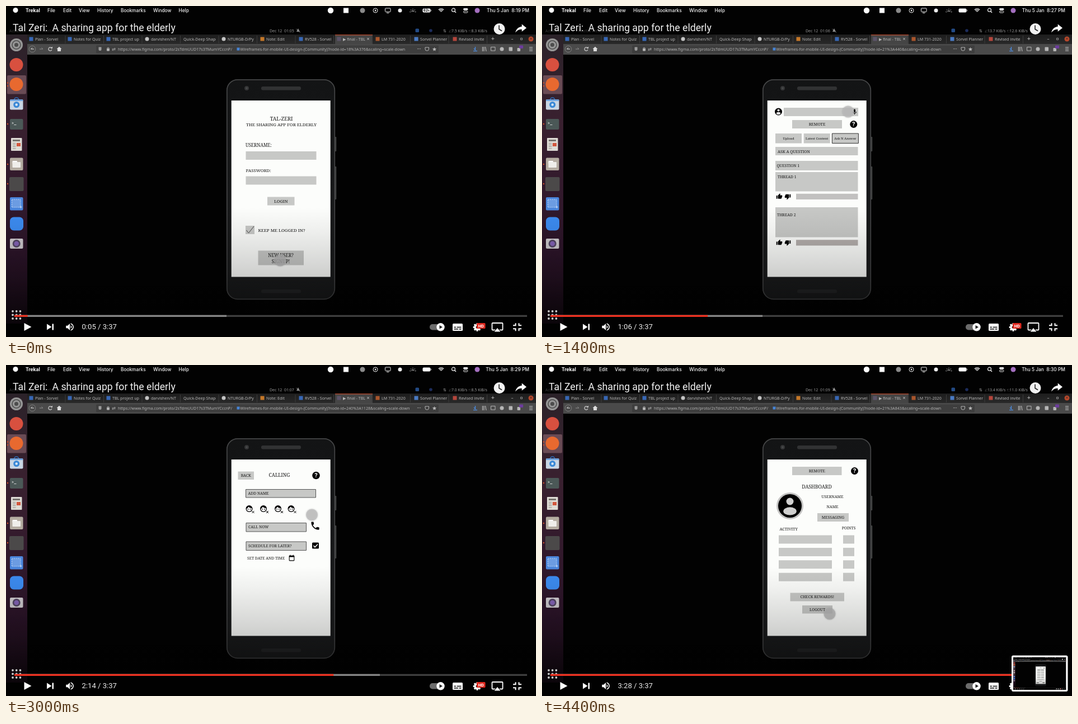
An HTML page with a canvas that plays this animation: 947x592 px, repeating every 4.6 s.

```html
<!DOCTYPE html>
<html lang="en">
<head>
<meta charset="utf-8">
<title>Sharing app walkthrough</title>
<style>
html, body { margin: 0; width: 100%; height: 100%; overflow: hidden; background: #000; }
canvas { display: block; width: 947px; height: 592px; }
</style>
</head>
<body>
<canvas id="stage" width="947" height="592"></canvas>
<script>
const ctx = document.getElementById('stage').getContext('2d');
const STEP = 200, STEPS = 23;
const SERIF = '"Noto Serif", serif', SANS = '"Noto Sans", sans-serif';
const MENU = 'Inter, sans-serif', UI = 'Roboto, sans-serif';
const GREY = '#c7c8c6', INK = '#161616', WHITE = '#fff';

// Known moments: step, video second, buffered x, touch point, page node, net speeds
const KEYS = [
  { at: 0, sec: 5, buf: 394, x: 490, y: 455, node: '18%3A376', down: '7.5', up: '8.3' },
  { at: 3, sec: 21, buf: 218, x: 499, y: 227, node: '21%3A680', down: '7.8', up: '6.4' },
  { at: 7, sec: 66, buf: 394, x: 547, y: 189, node: '21%3A440', down: '13.7', up: '12.6' },
  { at: 10, sec: 96, buf: 521, x: 525, y: 367, node: '72%3A371', down: '2.0', up: '3.5' },
  { at: 13, sec: 121, buf: 605, x: 556, y: 298, node: '240%3A1387', down: '10.3', up: '8.9' },
  { at: 17, sec: 148, buf: 731, x: 537, y: 238, node: '240%3A1128', down: '7.0', up: '8.5' },
  { at: 22, sec: 208, buf: 931, x: 514, y: 445, node: '21%3A843', down: '13.4', up: '11.0' }
];

const ICONS = {
  thumb: 'M1 21h4V9H1v12zm22-11c0-1.1-.9-2-2-2h-6.31l.95-4.57.03-.32c0-.41-.17-.79-.44-1.06L14.17 1 7.59 7.59C7.22 7.95 7 8.45 7 9v10c0 1.1.9 2 2 2h9c.83 0 1.54-.5 1.84-1.22l3.02-7.05c.09-.23.14-.47.14-.73v-2z',
  phone: 'M6.62 10.79c1.44 2.83 3.76 5.14 6.59 6.59l2.2-2.2c.27-.27.67-.36 1.02-.24 1.12.37 2.33.57 3.57.57.55 0 1 .45 1 1V20c0 .55-.45 1-1 1-9.39 0-17-7.61-17-17 0-.55.45-1 1-1h3.5c.55 0 1 .45 1 1 0 1.25.2 2.45.57 3.57.11.35.03.74-.25 1.02l-2.2 2.2z',
  mic: 'M12 14c1.66 0 3-1.34 3-3V5c0-1.66-1.34-3-3-3S9 3.34 9 5v6c0 1.66 1.34 3 3 3zm5.3-3c0 3-2.54 5.1-5.3 5.1S6.7 14 6.7 11H5c0 3.41 2.72 6.23 6 6.72V21h2v-3.28c3.28-.48 6-3.3 6-6.72h-1.7z',
  date: 'M19 4h-1V2h-2v2H8V2H6v2H5a2 2 0 0 0-2 2v14a2 2 0 0 0 2 2h14a2 2 0 0 0 2-2V6a2 2 0 0 0-2-2zm0 16H5V9h14z',
  sound: 'M3 9v6h4l5 5V4L7 9zM16.5 12a4.5 4.5 0 0 0-2.5-4v8a4.5 4.5 0 0 0 2.5-4zM14 3.2v2.1a7 7 0 0 1 0 13.4v2.1a9 9 0 0 0 0-17.6z',
  share: 'M14 3v5C6 9 2 14 0 21c4-5 8-7 14-7v5l10-8z',
  star: 'M12 2l3 7 8 .7-6 5 2 7.8-7-4-7 4 2-7.8-6-5 8-.7z'
};
for (const k in ICONS) ICONS[k] = new Path2D(ICONS[k]);

function rect(x1, y1, x2, y2, fill, r = 0) {
  ctx.fillStyle = fill;
  ctx.beginPath();
  ctx.roundRect(x1, y1, x2 - x1, y2 - y1, r);
  ctx.fill();
}
function frame(x1, y1, x2, y2, color, w = 1, r = 0) {
  ctx.strokeStyle = color;
  ctx.lineWidth = w;
  ctx.beginPath();
  ctx.roundRect(x1, y1, x2 - x1, y2 - y1, r);
  ctx.stroke();
}
function oval(x, y, rx, ry, fill) {
  ctx.fillStyle = fill;
  ctx.beginPath();
  ctx.ellipse(x, y, rx, ry, 0, 0, 7);
  ctx.fill();
}
const dot = (x, y, r, fill) => oval(x, y, r, r, fill);
function ring(x, y, r, color, w = 1, from = 0, to = 6.2832) {
  ctx.strokeStyle = color;
  ctx.lineWidth = w;
  ctx.beginPath();
  ctx.arc(x, y, r, from, to);
  ctx.stroke();
}
function line(color, w, ...p) {
  ctx.strokeStyle = color;
  ctx.lineWidth = w;
  ctx.beginPath();
  for (let i = 0; i < p.length; i += 2) ctx.lineTo(p[i], p[i + 1]);
  ctx.stroke();
}
function poly(fill, ...p) {
  ctx.fillStyle = fill;
  ctx.beginPath();
  for (let i = 0; i < p.length; i += 2) ctx.lineTo(p[i], p[i + 1]);
  ctx.fill();
}
function icon(name, x, y, size, fill = '#000', turn = 0) {
  ctx.save();
  ctx.translate(x, y);
  ctx.rotate(turn);
  ctx.scale(size / 24, size / 24);
  ctx.translate(-12, -12);
  ctx.fillStyle = fill;
  ctx.fill(ICONS[name], 'evenodd');
  ctx.restore();
}
// y is the middle of the capitals
function text(s, x, y, size, font, color, align = 'left', weight = 400) {
  ctx.font = `${weight} ${size}px ${font}`;
  ctx.fillStyle = color;
  ctx.textAlign = align;
  ctx.fillText(s, x, y + size * 0.36);
}
function fade(y1, y2, ...stops) {
  const g = ctx.createLinearGradient(0, y1, 0, y2);
  stops.forEach(([p, c]) => g.addColorStop(p, c));
  return g;
}

// App widgets
const mid = (s, x, y, size = 6.8) => text(s, x, y, size, SERIF, INK, 'center', 500);
const left = (s, x, y, size = 6.8) => text(s, x, y, size, SERIF, INK, 'left', 500);
const slab = (x1, y1, x2, y2) => rect(x1, y1, x2, y2, GREY);
function button(s, x1, y1, x2, y2, size) {
  slab(x1, y1, x2, y2);
  mid(s, (x1 + x2) / 2, (y1 + y2) / 2, size);
}
function help(x, y, r = 6.8) {
  dot(x, y, r, '#000');
  text('?', x, y, 11, UI, WHITE, 'center', 700);
}
function person(x, y, r, light) {
  dot(x, y, r, '#000');
  ctx.save();
  ctx.beginPath();
  ctx.arc(x, y, r * 0.86, 0, 7);
  ctx.clip();
  dot(x, y - r * 0.38, r * 0.31, light);
  oval(x, y + r * 0.45, r * 0.56, r * 0.34, light);
  ctx.restore();
}
function face(x, y, r, skin) {
  dot(x, y, r, '#000');
  ctx.save();
  ctx.beginPath();
  ctx.arc(x, y, r * 0.78, 0, 7);
  ctx.clip();
  ctx.fillStyle = skin;
  ctx.beginPath();
  ctx.moveTo(x - r, y + r * 0.1);
  ctx.quadraticCurveTo(x - r * 0.4, y - r * 0.1, x - r * 0.2, y - r * 0.6);
  ctx.quadraticCurveTo(x + r * 0.2, y - r * 0.1, x + r, y - r * 0.2);
  ctx.lineTo(x + r, y + r);
  ctx.lineTo(x - r, y + r);
  ctx.fill();
  ctx.restore();
  for (const d of [-0.32, 0.32]) dot(x + r * d, y + r * 0.15, r * 0.14, '#000');
}

function login() {
  mid('TAL-ZERI', 492, 202, 9.2);
  mid('THE SHARING APP FOR ELDERLY', 492, 212, 7.9);
  left('USERNAME:', 428, 249, 8);
  slab(428.5, 260, 554.5, 275);
  left('PASSWORD:', 428.5, 294, 7.8);
  slab(428.5, 304.5, 554.5, 319.5);
  button('LOGIN', 467, 341.5, 515.5, 356.5, 7.6);
  slab(428, 393, 444, 408);
  line('#4a4a4a', 1, 429.5, 401, 433.5, 406, 443, 394);
  left('KEEP ME LOGGED IN?', 450.5, 401, 7.9);
  slab(450.5, 437.5, 532, 463.5);
  mid('NEW USER?', 491, 446.5, 8);
  mid('SIGNUP!', 491, 457, 8);
}
function remote() {
  mid('REMOTE', 491.5, 198, 8.8);
  help(551.5, 197.5);
  const names = ['CHANNEL 1', 'CHANNEL 2', '', '', '', '', '', 'ALL'];
  names.forEach((s, i) => {
    const x = 428.5 + i % 2 * 66.5, y = 215.5 + (i >> 1) * 44.4;
    button(s, x, y, x + 59.5, y + 37);
  });
  button('ADD/MODIFY PREFERENCES', 420.5, 401, 562, 416, 7);
  button('OK', 465, 430, 517, 445);
  oval(439, 464, 26, 11.5, '#bdbdbb');
  oval(543, 463, 26, 11.5, '#bdbdbb');
  mid('MESSAGING/', 442, 461.5);
  mid('CALLING', 438.5, 470.5);
  mid('MENTOR', 544, 460);
  mid('MODE', 544, 468.5);
}
function header(dx, active) {
  ctx.save();
  ctx.translate(dx, 0);
  person(422.5, 189, 6.5, WHITE);
  slab(432, 182, 565, 197);
  icon('mic', 558.5, 189.5, 12);
  button('REMOTE', 447, 204, 536, 219, 7.1);
  help(556.8, 211.5, 6.5);
  ['Upload', 'Latest Content', 'Ask N Answer'].forEach((s, i) => {
    const x = 417 + i * 50.7;
    button(s, x, 228, x + 47, 245.5, 5.9);
    if (i === active) frame(x, 228, x + 47, 245.5, '#333');
  });
  ctx.restore();
}
function answers() {
  header(0, 2);
  slab(417, 252, 564.5, 267);
  left('ASK A QUESTION', 421, 260, 7);
  slab(417, 277, 564.5, 294);
  left('QUESTION 1', 419.5, 285.5, 6.9);
  slab(417, 297, 564.5, 331.5);
  left('THREAD 1', 421, 306);
  slab(417, 360, 564.5, 413.5);
  left('THREAD 2', 420, 373.5);
  for (const y of [341, 423.5]) {
    icon('thumb', 424, y - 0.5, 11.5);
    icon('thumb', 439, y, 11.5, '#000', Math.PI);
    rect(454, y - 5.3, 564.5, y + 5, y > 400 ? '#b3adab' : '#c2c1c0');
  }
}
function upload() {
  header(1, 0);
  mid('CHOOSE FROM CHANNEL NAMES', 491.5, 286);
  mid('RECOMMENDED HASHTAGS', 491.5, 321.5);
  for (const y of [295.5, 331.5])
    for (const x of [422, 471, 520]) slab(x, y, x + 41, y + 9);
  button('UPLOAD', 472.5, 351, 509, 366);
}
function titleBar(s, x) {
  button('BACK', 414.5, 190.5, 443, 205);
  mid(s, x, 197, 8.6);
  help(554, 197.5);
}
function group() {
  titleBar('GROUP NAME', 492);
  for (const x of [430, 447, 464.5, 482, 498]) face(x, 222.5, 6, WHITE);
  text('+', 543, 222.5, 9, UI, '#000', 'left', 700);
  for (const x of [550, 554.5]) {
    ring(x, 220.5, 2.1, '#000', 1.3);
    ring(x, 227.5, 3.5, '#000', 1.3, Math.PI, 0);
  }
  line('#000', 1.2, 545, 227.5, 558.5, 227.5);
  slab(424, 240.5, 477, 256.5);
  icon('phone', 431, 248.5, 10);
  left('CALL NOW', 437, 248.5, 6.6);
  slab(482.5, 240.5, 557, 256.5);
  icon('date', 491, 248, 11);
  left('SCHEDULE CALL', 498, 248.5);
  slab(447.5, 262, 525, 275);
  ring(456, 268.5, 4.3, '#000', 1.2, -2.8, 2.4);
  poly('#000', 449.5, 268, 453.5, 268, 451.5, 270.5);
  line('#000', 1, 456, 266, 456, 269, 458, 270);
  left('PREVIOUS CALLS', 463, 269, 6.9);
  for (const y of [289, 335.5, 382]) {
    slab(424, y, 557, y + 38.5);
    face(435.5, y + 13, 7.5, GREY);
    if (y > 300) left('MESSAGE', 451, y + 11);
  }
  left('CALL SCHEDULED - TIME', 451, 298);
  frame(443.5, 310, 489, 321.5, '#444');
  mid('AVAILABLE', 466, 316, 6.6);
  frame(495, 310, 550.5, 321.5, '#444');
  mid('UNAVAILABLE', 522.7, 316, 6.6);
  frame(424.5, 437, 548.5, 452, '#444');
  icon('mic', 540, 444.5, 12);
}
function field(s, x1, y1, x2, y2) {
  slab(x1, y1, x2, y2);
  frame(x1, y1, x2, y2, '#555');
  left(s, x1 + 4, (y1 + y2) / 2 - 0.5);
}
function calling() {
  titleBar('CALLING', 488.5);
  field('ADD NAME', 428.5, 222.5, 553.5, 237);
  for (const x of [434.5, 460, 486, 509.5]) {
    face(x, 257, 6, WHITE);
    line('#000', 1, x + 5, 261, x + 9, 265);
    line('#000', 1, x + 9, 261, x + 5, 265);
  }
  field('CALL NOW', 429, 282.5, 536.5, 298);
  icon('phone', 552.5, 287.5, 19);
  field('SCHEDULE FOR LATER?', 429, 316, 536.5, 331.5);
  rect(547, 317.5, 559, 328.5, '#000', 1.5);
  line(WHITE, 1.5, 549.5, 323, 552, 325.8, 557, 320.5);
  left('SET DATE AND TIME', 431, 346);
  icon('date', 510.5, 345, 13);
}
function dashboard() {
  button('REMOTE', 447, 182, 535.5, 197, 7);
  help(558.5, 189.5, 6.5);
  mid('DASHBOARD', 491, 217.5, 8.6);
  dot(443, 252, 24, '#c4c4c3');
  person(443, 252, 21, '#d0d0cf');
  mid('USERNAME', 519, 235.5, 7);
  mid('NAME', 519, 253, 7);
  button('MESSAGING', 492, 265, 548, 280, 6.9);
  left('ACTIVITY', 424.5, 293.5, 7.1);
  mid('POINTS', 548, 291.5);
  for (let i = 0; i < 4; i++) {
    const y = 304.5 + i * 22.4;
    slab(423, y, 518, y + 15);
    slab(538, y, 558, y + 15);
  }
  button('CHECK REWARDS!', 443.5, 407.5, 540, 422.5, 6.9);
  button('LOGOUT', 465, 430, 519, 444.5);
}
const SCREENS = [login, remote, answers, upload, group, calling, dashboard];

function phone(state) {
  rect(587, 234, 590.3, 260, '#3f4040', 1);
  rect(587, 287, 590.3, 346, '#3f4040', 1);
  rect(394, 131, 588, 525, fade(131, 525, [0, '#131415'], [1, '#1a1b1c']), 20);
  frame(394.8, 131.8, 587.3, 524.3, '#454647', 1.7, 19);
  dot(430, 147, 4, '#343536');
  dot(430, 147, 1.7, '#4a4b4c');
  rect(456, 144, 527, 150.5, '#313233', 3);
  rect(456, 507, 527, 513.5, '#242526', 3);
  rect(402.7, 169, 579.7, 484.6, '#fcfdfb');
  SCREENS[state.scene]();
  ctx.save();
  ctx.shadowColor = 'rgba(120,120,120,.5)';
  ctx.shadowBlur = 3;
  dot(state.x, state.y, 10.5, 'rgba(188,188,188,.74)');
  ctx.restore();
}

function tab(s, x, mark, round) {
  ctx.save();
  ctx.beginPath();
  ctx.rect(x - 12, 52, mark ? 60 : 70, 16);
  ctx.clip();
  if (mark) round ? dot(x - 7, 59, 3.5, mark) : rect(x - 10.5, 55.5, x - 3.5, 62.5, mark);
  text(s, x, 59, 7.1, SANS, '#b8b8b8');
  ctx.restore();
}
function browser(state) {
  const { key } = state, dim = '#8c8c8c', soft = '#b5b5b5';
  text('Activities', 6, 44, 7, SANS, '#3a3a3a');
  text('Firefox Web Browser', 65, 44, 7, SANS, '#333');
  const minute = 5 + Math.floor((state.sec + 35) / 60);
  text(`Dec 12  01:0${minute}`, 471, 44, 7, SANS, '#9a9a9a');
  poly(dim, 519, 46, 522, 40, 525, 46);
  line(dim, 0.8, 518.5, 41, 526, 47.5);
  rect(731.5, 40.5, 738, 47, '#234b86', 1.5);
  dot(759, 44, 2.8, '#1c2c5c');
  text(`⇅  ↓:${key.down} KiB/s ↑:${key.up} KiB/s`, 781, 44, 7, SANS, '#9a9a9a');

  rect(38, 51, 947, 68, fade(51, 68, [0, '#1d1d1d'], [1, '#292929']));
  rect(588, 51, 655, 68, '#454545');
  rect(588, 51, 655, 52.5, '#a3442c');
  for (let x = 106; x < 870; x += 68.5) line('#3d3d3d', 1, x, 53, x, 67);
  const blue = '#3767b5', dark = '#c4c4c4';
  tab('Plan - Sorvel', 52, blue);
  tab('Notes for Quiz', 121, blue);
  tab('TBL project up', 190, blue);
  tab('darvishen/NT', 259, dark, true);
  tab('Quick-Deep Shape', 317);
  tab('NTURGB-D/Py', 396, dark, true);
  tab('Note: Edit', 465, '#c47728');
  tab('RV528 - Sorvel', 534, blue);
  tab('▶ final - TBL', 602, '#5c5468');
  text('×', 647, 59, 9, SANS, '#ccc', 'center');
  tab('LM 731-2020', 671, '#a8552c');
  tab('Sorvel Planner', 740, '#4a7bc4');
  tab('Revised invite', 809, '#b5463c');
  text('+', 870, 58.5, 11, SANS, '#ccc', 'center');
  text('–', 904.5, 59, 8, SANS, '#aaa', 'center');
  frame(919.5, 57.5, 922.5, 60.5, '#aaa', 0.8);
  dot(938, 59, 4.5, '#b5472b');
  text('×', 938, 58.8, 7, SANS, '#222', 'center');

  rect(38, 68, 947, 87, '#4a4a4a');
  rect(161, 70.5, 773, 84.5, '#3e3e3e', 2);
  ring(47, 77, 5.8, '#888', 0.8);
  line('#ddd', 1, 50, 77, 44.5, 77, 47, 74.5);
  line(dim, 1, 60, 77, 66, 77, 63.5, 74.5);
  ring(79, 77, 3, '#ccc', 1.2, 0.3, 5.4);
  poly('#ccc', 79.5, 76, 83, 76, 83, 72.5);
  poly('#ddd', 90.5, 77, 95, 72.8, 99.5, 77, 98, 77, 98, 81, 92, 81, 92, 77);
  rect(165.5, 73.5, 170.5, 80, '#9b9b9b', [0, 0, 3, 3]);
  rect(180, 76, 185, 80.5, soft, 1);
  ring(182.5, 76, 1.7, soft, 1, Math.PI, 0);
  text('⇄', 192.5, 77, 8, SANS, soft, 'center');
  text('https://www.figma.com/proto/2sTdmUUD17s3TMumYCccnP/', 200, 77, 7.15, SANS, soft);
  rect(412.5, 74.5, 417.5, 79.5, '#4784d5');
  text(`Wireframes-for-mobile-UI-design-(Community)?node-id=${key.node}&scaling=scale-down`, 418.5, 77, 7.15, SANS, soft);
  text('•••', 738, 77, 6, SANS, soft, 'center');
  frame(749, 74, 755.5, 80, soft, 1, [0, 0, 3, 3]);
  icon('star', 765.5, 77, 8, soft);
  line('#4c8ce0', 1.3, 838.5, 73, 838.5, 78.5, 836, 76);
  line('#4c8ce0', 1.3, 835, 80.5, 842, 80.5);
  for (const x of [851.5, 854, 856.5]) line(soft, 1.3, x, 73, x + (x > 856 ? 1.5 : 0), 81);
  frame(866.5, 73.5, 874, 80, soft);
  dot(886, 77, 3.5, soft);
  rect(898.5, 73.5, 905, 80.5, soft, 1);
  rect(913.5, 75, 919, 81, soft, 1);
  rect(917, 70.5, 924, 76, '#6c3c9c', 1);
  for (const y of [74, 77, 80]) line('#ccc', 1, 935, y, 941, y);
}

function dock() {
  rect(0, 51, 38, 568, fade(51, 568, [0, '#2b2229'], [0.3, '#39202f'], [0.75, '#2c1429'], [1, '#170b15']));
  rect(2, 124, 36, 157.5, '#694b55', 2);
  for (const y of [137.5, 143, 211, 283, 318]) dot(3, y, 1.2, '#d4502a');
  dot(18.5, 69.5, 11.5, '#969696');
  ring(18.5, 69.5, 7.5, '#4c4c4c', 1.5);
  dot(18.5, 69.5, 3.5, '#4c4c4c');
  dot(18.5, 105, 12, '#d8503f');
  dot(18.5, 140, 12, '#e8692f');
  ring(18.7, 168, 4, '#2c6cb8', 1.6, Math.PI, 0);
  rect(7, 167, 30.5, 185.5, '#c9d6e4', 2);
  rect(7, 167, 30.5, 170, '#6fa3dc', [2, 2, 0, 0]);
  dot(18.7, 176.5, 5.5, '#3a88d6');
  dot(18.7, 176.5, 2.2, '#d5e4f2');
  rect(7, 202, 30.5, 221, '#4b5857', 2);
  text('>_', 10, 209, 7, '"Noto Sans Mono", monospace', '#e8e8e8', 'left', 700);
  rect(9, 236, 28.5, 259, '#dedbd5', 1);
  rect(12, 239, 25, 242, '#77746f');
  rect(19, 245, 26, 251, '#d2573e');
  for (const y of [245.5, 248.5, 251.5, 255]) line('#8e8b86', 1, 12, y, 17.5, y);
  rect(7, 271.5, 30.5, 294, '#b4aca1', 2);
  rect(11.5, 277, 20, 282, WHITE, 1);
  rect(11.5, 279, 26, 289, '#efeeea', 1);
  rect(6, 306, 31.5, 331, '#4b4949', 2);
  rect(7, 342, 30.5, 365.5, '#4b86dc', 2);
  rect(10.5, 346, 26, 360, 'rgba(255,255,255,.18)');
  ctx.setLineDash([2, 1.5]);
  frame(10.5, 346, 26, 360, '#c8dcf8');
  ctx.setLineDash([]);
  text('+', 26.5, 360.5, 8, SANS, WHITE, 'center');
  rect(7, 377.5, 31, 401.5, '#3c8bf0', 7);
  rect(7, 416, 30.5, 434, '#cdc9cd', 2);
  dot(18.7, 425, 7, '#544765');
  dot(18.7, 425, 4.3, '#8262b5');
}

function menuBar(state) {
  rect(0, 0, 947, 16, '#020202');
  dot(17, 7.5, 4.5, WHITE);
  text('Trekal', 35, 7.8, 8.5, MENU, WHITE, 'left', 700);
  const items = { File: 74, Edit: 102, View: 130, History: 163, Bookmarks: 205, Window: 263, Help: 308.5 };
  for (const s in items) text(s, items[s], 7.8, 8.3, MENU, '#f4f4f4', 'left', 500);
  const w = '#eee';
  dot(580, 8, 5.2, WHITE);
  rect(603, 3.5, 612, 12.5, WHITE);
  dot(637, 8, 4.5, '#8a8a8a');
  ring(660, 8, 4, w);
  poly(w, 659, 6, 662, 8, 659, 10);
  frame(677.5, 4, 687, 10.5, w, 1, 1);
  line(w, 1, 680, 12.5, 684.5, 12.5);
  dot(704, 8, 3.5, w);
  ring(727, 10.5, 2, w, 1, Math.PI, 0);
  for (let i = 0; i < 5; i++) {
    const a = Math.PI * (1 + i / 4);
    dot(727 + 4.8 * Math.cos(a), 10.5 + 4.8 * Math.sin(a), 0.7, w);
  }
  rect(744.5, 4.5, 758.5, 11.5, WHITE, 2);
  rect(759.2, 6.8, 760.2, 9.3, '#bbb');
  if (state.step === 0) text('62ϟ', 751.5, 8, 6, MENU, '#000', 'center', 700);
  for (const r of [2, 4.3, 6.6]) ring(777.5, 11.5, r, w, 1.4, -2.35, -0.79);
  ring(799.5, 7.2, 3, w, 1.2);
  line(w, 1.3, 801.7, 9.5, 804, 12);
  rect(817, 4, 825.5, 7.5, w, 2);
  frame(817.5, 9, 825, 12, w, 1, 1.5);
  dot(842, 8, 4.5, '#a46fc0');
  const m = [[20, 30], [15, 29], [9, 28], [1, 27], [0, 19]].find(([s]) => state.step >= s)[1];
  text(`Thu 5 Jan  8:${m} PM`, 935, 7.8, 8.4, MENU, '#f4f4f4', 'right', 500);
}

function player(state) {
  text('Tal Zeri:', 12, 39, 17.7, UI, '#f2f2f2');
  text('A sharing app for the elderly', 82.5, 39, 17.7, UI, '#f2f2f2');
  dot(881.5, 41, 10, '#f2f2f2');
  line('#222', 1.6, 881, 34.5, 881, 41.5, 886, 44.5);
  icon('share', 920, 40, 20, WHITE);

  for (let i = 0; i < 9; i++) dot(12 + i % 3 * 6.7, 546 + (i / 3 | 0) * 6.5, 1.9, '#c9c9c9');
  const bar = (x, color) => rect(15, 552.8, x, 555.9, color);
  bar(931, '#3f3f3f');
  bar(state.buf, '#868686');
  bar(15 + (state.sec + 0.6) / 217 * 916, '#f0311f');

  poly(WHITE, 32.5, 567, 45.5, 574, 32.5, 581);
  poly(WHITE, 73, 568.5, 81.5, 574, 73, 579.5);
  rect(82.5, 568.5, 85, 579.5, WHITE);
  icon('sound', 114, 574, 18, WHITE);
  const s = Math.floor(state.sec);
  text(`${s / 60 | 0}:${String(s % 60).padStart(2, '0')} / 3:37`, 135.5, 573.5, 13.1, UI, '#eee');

  rect(757, 569, 782, 579.5, '#6b6b6b', 5);
  dot(776.5, 574.3, 7.2, WHITE);
  poly('#222', 774.5, 571, 780, 574.3, 774.5, 577.6);
  rect(798, 568, 816, 581, WHITE, 1.5);
  line('#111', 1.6, 800.5, 574.5, 804, 574.5);
  line('#111', 1.6, 805.5, 574.5, 813.5, 574.5);
  line('#111', 1.6, 800.5, 577.8, 808, 577.8);
  line('#111', 1.6, 809.5, 577.8, 813.5, 577.8);
  for (let i = 0; i < 4; i++) {
    const a = i * Math.PI / 4, c = Math.cos(a) * 7.3, d = Math.sin(a) * 7.3;
    line(WHITE, 3.2, 842 - c, 574.5 - d, 842 + c, 574.5 + d);
  }
  dot(842, 574.5, 5.6, WHITE);
  dot(842, 574.5, 2.3, '#000');
  rect(841, 567, 856.5, 577, '#e02a20', 1.5);
  text('HD', 848.8, 572, 7.5, UI, WHITE, 'center', 700);
  frame(868.5, 567, 887.5, 579.5, WHITE, 1.8, 1);
  poly('#000', 871, 583, 878, 574, 885, 583);
  poly(WHITE, 872.5, 582.5, 878, 576, 883.5, 582.5);
  for (const [sx, sy] of [[-1, -1], [1, -1], [-1, 1], [1, 1]])
    line(WHITE, 2, 913.5 + sx * 7.5, 574.3 + sy * 3, 913.5 + sx * 3, 574.3 + sy * 3, 913.5 + sx * 3, 574.3 + sy * 7);
}

function preview() {
  rect(839, 519.5, 939.5, 584, WHITE, 3);
  ctx.save();
  ctx.beginPath();
  ctx.rect(842, 522.5, 94.5, 58.5);
  ctx.clip();
  ctx.translate(842, 522.5);
  ctx.scale(94.5 / 947, 58.5 / 592);
  paint(stateAt(3));
  ctx.restore();
}

function stateAt(step) {
  const n = Math.max(0, KEYS.findIndex(k => k.at >= step) - 1);
  const a = KEYS[n], b = KEYS[n + 1];
  const p = (step - a.at) / (b.at - a.at);
  const mix = name => a[name] + (b[name] - a[name]) * p;
  const scene = p < 0.5 ? n : n + 1;
  return { step, scene, key: KEYS[scene], sec: mix('sec'), buf: mix('buf'), x: mix('x'), y: mix('y') };
}

function paint(state) {
  rect(0, 0, 947, 592, '#020202');
  browser(state);
  dock();
  phone(state);
  rect(0, 360, 947, 592, fade(360, 592, [0, 'rgba(0,0,0,0)'], [0.17, 'rgba(0,0,0,.05)'], [0.54, 'rgba(0,0,0,.19)'], [1, 'rgba(0,0,0,.65)']));
  menuBar(state);
  player(state);
  if (state.step === STEPS - 1) preview();
}

function tick() {
  paint(stateAt(Math.floor(performance.now() / STEP) % STEPS));
  requestAnimationFrame(tick);
}
tick();
</script>
</body>
</html>
```
